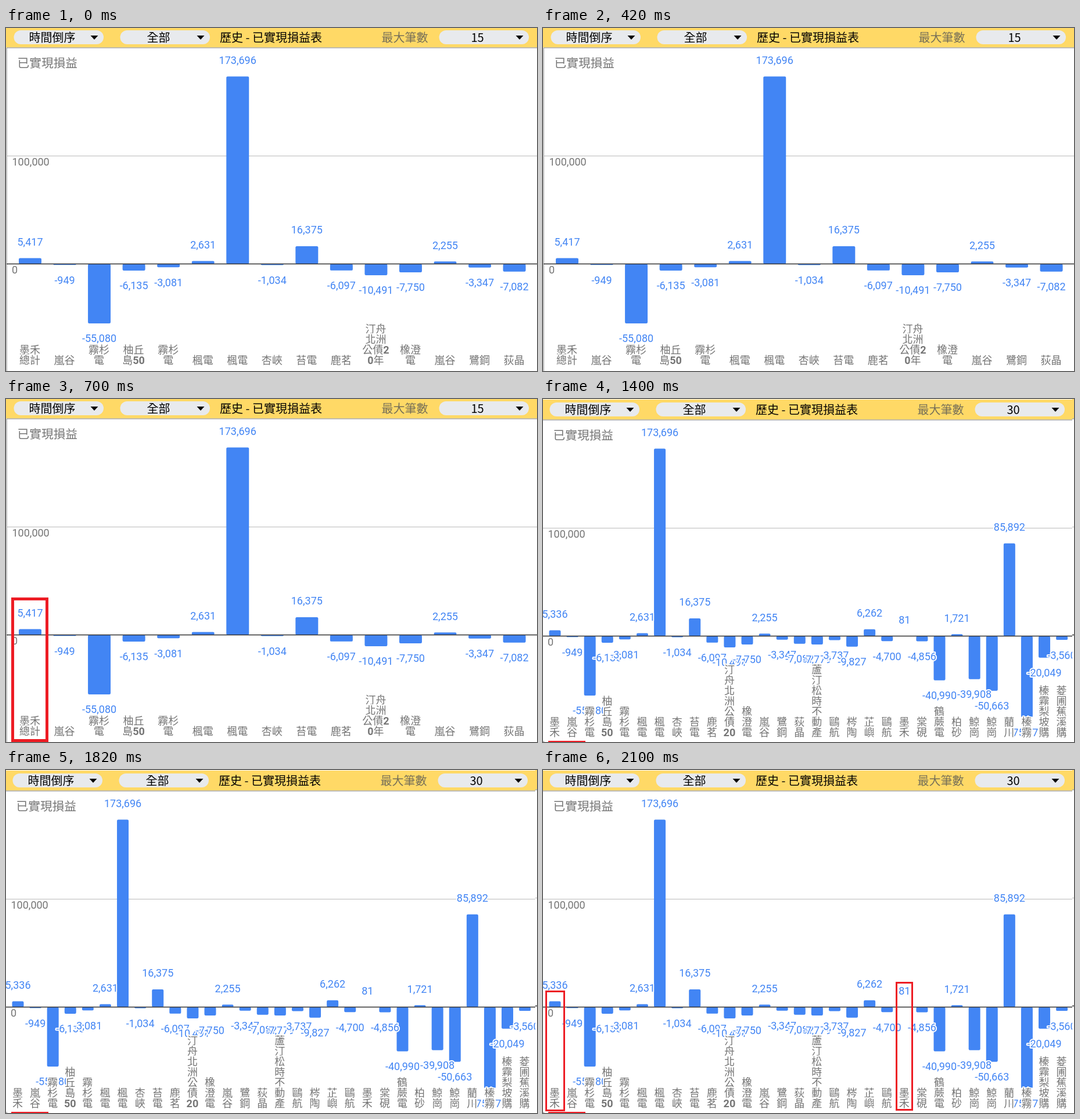
Write an HTML page that moves like this. It is 914 by 591 pixels and loops after 2800 ms.

```html
<!DOCTYPE html>
<html lang="zh-Hant">
<head>
<meta charset="utf-8">
<title>已實現損益</title>
<style>
html, body { margin: 0; width: 100%; height: 100%; overflow: hidden; background: #fff; }
svg { display: block; width: 914px; height: 591px; }
text { font-family: Roboto, "Noto Sans CJK TC", "Noto Sans CJK", sans-serif; font-size: 18px; }
.head { font-family: "Noto Sans CJK TC", "Noto Sans CJK", sans-serif; font-size: 20px; }
.grey { fill: #757575; }
.bar { fill: #4285f4; }
.halo { stroke: #fff; stroke-width: 4px; stroke-linejoin: round; paint-order: stroke; text-anchor: middle; }
.num { font-weight: 700; }
.box { fill: none; stroke: #ed1c24; }
.step { animation: 2800ms step-end infinite; }
.q1 { animation-name: q1; }
.q2 { animation-name: q2; }
.q3 { animation-name: q3; }
@keyframes q1 { 0% { opacity: 0 } 25%, 100% { opacity: 1 } }
@keyframes q2 { 0% { opacity: 0 } 50%, 100% { opacity: 1 } }
@keyframes q3 { 0% { opacity: 0 } 75%, 100% { opacity: 1 } }
</style>
</head>
<body>
<svg id="stage" viewBox="0 0 914 591"></svg>
<script>
const ZERO = 406.5, UNIT = 0.0018596;

const short = {
  x: 41.5, step: 59.54, width: 39, limit: 15,
  data: [
    [5417, '墨禾/總計'], [-949, '嵐谷'], [-55080, '霧杉/電'], [-6135, '柚丘/島50'],
    [-3081, '霧杉/電'], [2631, '楓電'], [173696, '楓電'], [-1034, '杏峽'],
    [16375, '苔電'], [-6097, '鹿茗'], [-10491, '汀舟/北洲/公債2/0年'],
    [-7750, '橡澄/電'], [2255, '嵐谷'], [-3347, '鷺鋼'], [-7082, '荻晶']
  ]
};

const long = {
  x: 22.5, step: 30.09, width: 20, limit: 30,
  data: [
    [5336, '墨禾'], [-949, '嵐谷'], [-55080, '霧杉電'], [-6135, '柚丘島50'],
    [-3081, '霧杉電'], [2631, '楓電'], [173696, '楓電'], [-1034, '杏峽'],
    [16375, '苔電'], [-6097, '鹿茗'], [-10491, '汀舟北洲公債20'], [-7750, '橡澄電'],
    [2255, '嵐谷'], [-3347, '鷺鋼'], [-7082, '荻晶'], [-7779, '蘆汀松時不動產'],
    [-3737, '鷗航'], [-9827, '梣陶'], [6262, '芷嶼'], [-4700, '鷗航'],
    [81, '墨禾'], [-4856, '棠硯'], [-40990, '鶴蕨電'], [1721, '柏砂'],
    [-39908, '鯨崗'], [-50663, '鯨崗'], [85892, '藺川'], [-75077, '榛霧'],
    [-20049, '榛霧梨坡購'], [-3560, '菱圃蕉溪購']
  ].map(([v, name]) => [v, name.match(/\d+|\D/g).join('/')])
};

const rect = (x, y, w, h, attrs) =>
  `<rect x="${x}" y="${y}" width="${w}" height="${h}" ${attrs}/>`;
const text = (x, y, str, attrs) => `<text x="${x}" y="${y}" ${attrs}>${str}</text>`;
const rule = (y, color, width) =>
  `<path d="M1 ${y}H920" stroke="${color}" stroke-width="${width}"/>`;

function pill(x, label) {
  return rect(x, 4, 154.5, 24, 'rx="12" fill="#e8eaed"') +
    text(x + 66, 23.5, label, 'class="head" text-anchor="middle"') +
    `<path d="M${x + 132} 13h13l-6.5 7z"/>`;
}

function header(limit) {
  return rect(-2, -1, 924, 34.5, 'fill="#ffd966"') +
    rule(34.2, '#999', 1.3) +
    pill(13.5, '時間倒序') + pill(196.5, '全部') + pill(745.5, limit) +
    text(368, 23.5, '歷史 - 已實現損益表', 'class="head"') +
    text(646.5, 23.5, '最大筆數', 'class="head" fill="#756f58"');
}

function bar(x, v, w) {
  const h = Math.abs(v) * UNIT;
  return rect(x - w / 2, v > 0 ? ZERO - h : ZERO, w, h, 'rx="2.2" class="bar"');
}

function value(x, v) {
  const mid = ZERO - v * UNIT + (v > 0 ? -28 : 26);
  return text(x, mid + 6.4, v.toLocaleString('en-US'), 'class="halo bar"');
}

function category(x, name) {
  const lines = name.split('/');
  return lines.map((line, i) => text(x, 579 - 18 * (lines.length - 1 - i),
    line.replace(/\d+/, '<tspan class="num">$&</tspan>'), 'class="halo grey"')).join('');
}

function chart(c) {
  const each = draw => c.data.map((d, i) => draw(c.x + c.step * i, d)).join('');
  return header(c.limit) +
    '<path d="M1.2 34V591" stroke="#999" stroke-width="1.2"/>' +
    rule(220.5, '#bbb', 1.2) +
    text(19.5, 67.5, '已實現損益', 'class="grey" style="font-size:20.7px"') +
    text(10.5, 237.4, '100,000', 'class="grey"') +
    text(10, 423, '0', 'class="grey"') +
    each((x, d) => bar(x, d[0], c.width)) +
    rule(ZERO, '#333', 1.3) +
    each((x, d) => value(x, d[0])) +
    each((x, d) => category(x - 0.5, d[1]));
}

document.getElementById('stage').innerHTML =
  '<clipPath id="pane"><rect width="911" height="589"/></clipPath>' +
  chart(short) +
  rect(11.5, 344.5, 59, 244, 'class="box step q1" stroke-width="5"') +
  '<g class="step q2" clip-path="url(#pane)">' +
    rect(0, 0, 911, 589, 'fill="#fff"') +
    `<g transform="translate(-2 2)">${chart(long)}</g>` +
    '<g class="step q3" stroke-width="3">' +
      rect(5.5, 381.5, 31, 205, 'class="box"') +
      rect(608.5, 366.5, 27, 219, 'class="box"') +
    '</g></g>';
</script>
</body>
</html>
```
